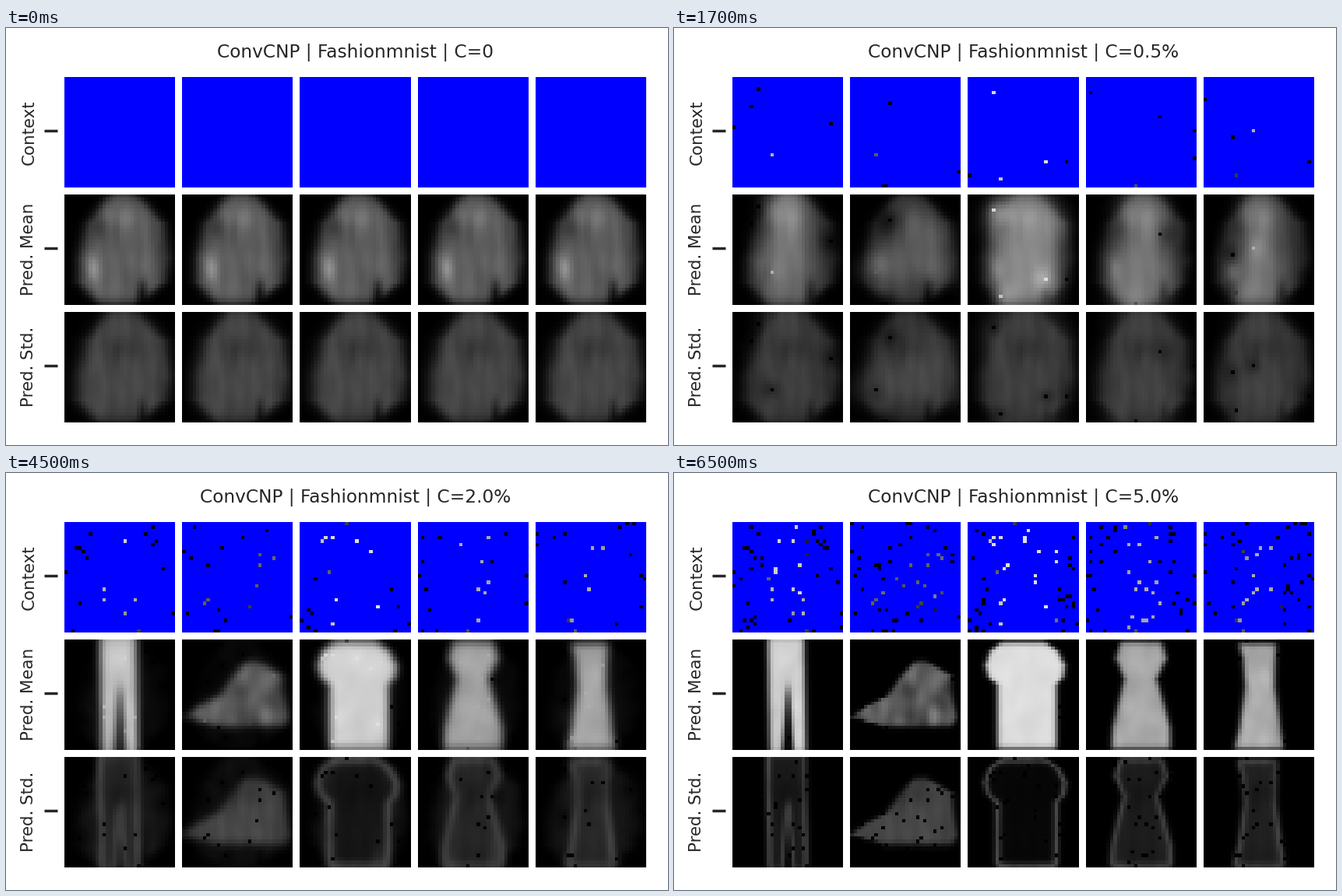
A matplotlib script that plays this animation: 850x536 px, repeating every 8 s.

```python
import numpy as np
import matplotlib.pyplot as plt
from matplotlib.animation import FuncAnimation

W, H, DPI = 850, 536, 100
N, PAD = 32, 2
PITCH = N + PAD
INK = "#262626"

# Per level: label, context size, trust in the garment, blur of the guess
STAGES = [("0", 0, 0, 3), ("0.5%", 5, .35, 2.4), ("1.0%", 10, .6, 1.8),
          ("2.0%", 20, .88, .9), ("5.0%", 51, 1, .4)]

plt.rcParams["font.family"] = "DejaVu Sans"
yy, xx = np.mgrid[:N, :N].astype(float)
rng = np.random.default_rng(7)


def sigmoid(z):
    return 1 / (1 + np.exp(-np.clip(z, -40, 40)))


def spot(cx, cy, rx, ry):
    return np.exp(-((xx - cx) / rx) ** 2 - ((yy - cy) / ry) ** 2)


def silhouette(knots, soft):
    """Soft mask of a shape given by its left and right edge at a few rows."""
    rows, left, right = np.array(knots, float).T
    lo, hi = np.interp(yy, rows, left), np.interp(yy, rows, right)
    sides = sigmoid((xx - lo) / soft) * sigmoid((hi - xx) / soft)
    return sides * sigmoid((yy - rows[0]) / soft) * sigmoid((rows[-1] - yy) / soft)


def gaussian(sigma):
    i = np.arange(N)
    kernel = np.exp(-(i - i[:, None]) ** 2 / (2 * sigma ** 2))
    return kernel / kernel.sum(axis=1, keepdims=True)


def blur(image, sx, sy=None):
    return gaussian(sy or sx) @ image @ gaussian(sx).T


def streaks(amount, sx=.9, sy=3):
    noise = blur(rng.standard_normal((N, N)), sx, sy)
    return 1 + amount * noise / noise.std()


# The guess without context: a mottled oval with a notch at the lower right
oval = silhouette([(-1, 13, 20), (8, 6.5, 28), (18, 4, 29.5), (25, 4, 28), (31, 9, 21)], 1)
oval *= 1 - .75 * spot(22, 29, 1.6, 5)
prior = oval * streaks(.05) * (.38 + .2 * spot(7.5, 20.5, 2, 4) + .08 * spot(16, 6, 5, 3)
                               - .15 * spot(9.5, 9, 2.5, 4) - .08 * spot(28, 16, 3, 9))
doubt = streaks(.06) * (1 - .28 * spot(17, 10, 6, 4))


class Garment:
    def __init__(self, knots, grey, sureness, mottle, early, cut=0):
        self.mask = silhouette(knots, .4) * (1 - cut)
        self.light = self.mask * grey * streaks(mottle, 1.2, 2)
        self.sureness = sureness
        taken = {x + N * y for x, y in early}
        later = [divmod(c, N)[::-1] for c in rng.permutation(N * N) if c not in taken]
        self.cells = early + later

    def grey(self, x, y):
        value = self.light[y, x]
        return value if value > .1 else 0


slit = sigmoid((.3 + (yy - 13) / 14 - abs(xx - 15.5)) / .3) * sigmoid(yy - 13)
garments = [
    # trousers
    Garment([(-1, 9.8, 20.2), (12, 10, 20.4), (32, 10.4, 20.7)], .82, .65, .02,
            [(7, 3), (5, 8), (0, 14), (28, 13), (11, 22)], slit),
    # sandal
    Garment([(6, 18, 22), (10, 14.5, 28.5), (16, 10, 29), (19, 4, 29.5), (22, 0, 30),
             (24.5, 9, 29)], .37, 0, .17,
            [(11, 7), (7, 22), (31, 27), (9, 31), (10, 31)]),
    # T-shirt
    Garment([(.4, 9, 22), (3, 6, 25.5), (7, 4.5, 27.5), (10.5, 5.5, 27), (12.5, 8.1, 25),
             (31, 8.1, 25)], .87, .9, .01,
            [(7, 4), (22, 24), (28, 24), (0, 28), (9, 29)]),
    # puffed dress
    Garment([(.3, 9.5, 21.5), (5, 8.3, 22.8), (11, 10.8, 20), (18, 9, 22), (25, 7.4, 23.8),
             (31, 7, 24)], .66, .6, .03,
            [(1, 4), (21, 11), (31, 15), (31, 23), (14, 31)]),
    # slim dress
    Garment([(.8, 9.8, 20.4), (5, 11, 20.2), (13, 11.6, 20), (25, 10, 21.6), (31, 8.5, 22.6)],
            .67, .55, .04,
            [(0, 6), (8, 17), (14, 15), (30, 24), (9, 28)]),
]


def tiles(garment, count, trust, sigma):
    """Context, mean and spread: the prior gives way to the garment, first near known cells."""
    context = np.zeros((N, N, 3))
    context[..., 2] = 1
    cells = garment.cells[:count]
    near, known = np.zeros((2, N, N))
    for x, y in cells:
        near = np.maximum(near, spot(x, y, 3.5, 3.5))
        known = np.maximum(known, garment.grey(x, y) * spot(x, y, 2.3, 2.3))
    mix = trust + (1 - trust) * .6 * near

    mean = (1 - mix) * prior + mix * blur(garment.light, sigma)
    mask = (1 - mix) * oval + mix * blur(garment.mask, sigma)
    sure = garment.sureness * trust ** 2
    std = .28 * doubt * (mask ** .65 * (1 - sure) + sure * 4 * mask * (1 - mask))
    std *= 1 - .7 * known * (1 - trust)
    for x, y in cells:
        context[y, x] = mean[y, x] = garment.grey(x, y)
        std[y, x] = 0
    return context, mean[..., None], std[..., None]


def sheet(count, trust, sigma):
    """The whole grid of tiles as one RGB image."""
    image = np.ones((3 * PITCH - PAD, len(garments) * PITCH - PAD, 3))
    for col, garment in enumerate(garments):
        for row, tile in enumerate(tiles(garment, count, trust, sigma)):
            image[row * PITCH:row * PITCH + N, col * PITCH:col * PITCH + N] = tile
    return np.clip(image, 0, 1)


sheets = [sheet(*settings) for _, *settings in STAGES]

fig = plt.figure(figsize=(W / DPI, H / DPI), dpi=DPI, facecolor="white")
ax = fig.add_axes([0, 0, 1, 1])
picture = ax.imshow(sheets[0], extent=(75, 822, 507.3, 63.5), aspect="auto",
                    interpolation="nearest")
ax.set(xlim=(0, W), ylim=(H, 0))
ax.axis("off")
title = ax.text(448.5, 38, "", ha="center", va="baseline", size=16.73, color=INK)
for label, y, tick in [("Context", 134, 132), ("Pred. Mean", 284, 283), ("Pred. Std.", 435, 434)]:
    ax.text(35.5, y, label, rotation=90, rotation_mode="anchor", ha="center",
            va="baseline", size=15.4, color=INK)
    ax.plot([49.5, 66.2], [tick, tick], color=INK, lw=2.5, solid_capstyle="butt")


def update(frame):
    stage = (frame + 3) // 4
    picture.set_data(sheets[stage])
    title.set_text(f"ConvCNP | Fashionmnist | C={STAGES[stage][0]}")
    return picture, title


anim = FuncAnimation(fig, update, frames=16, interval=500, repeat=True, repeat_delay=0)
plt.show()
```
